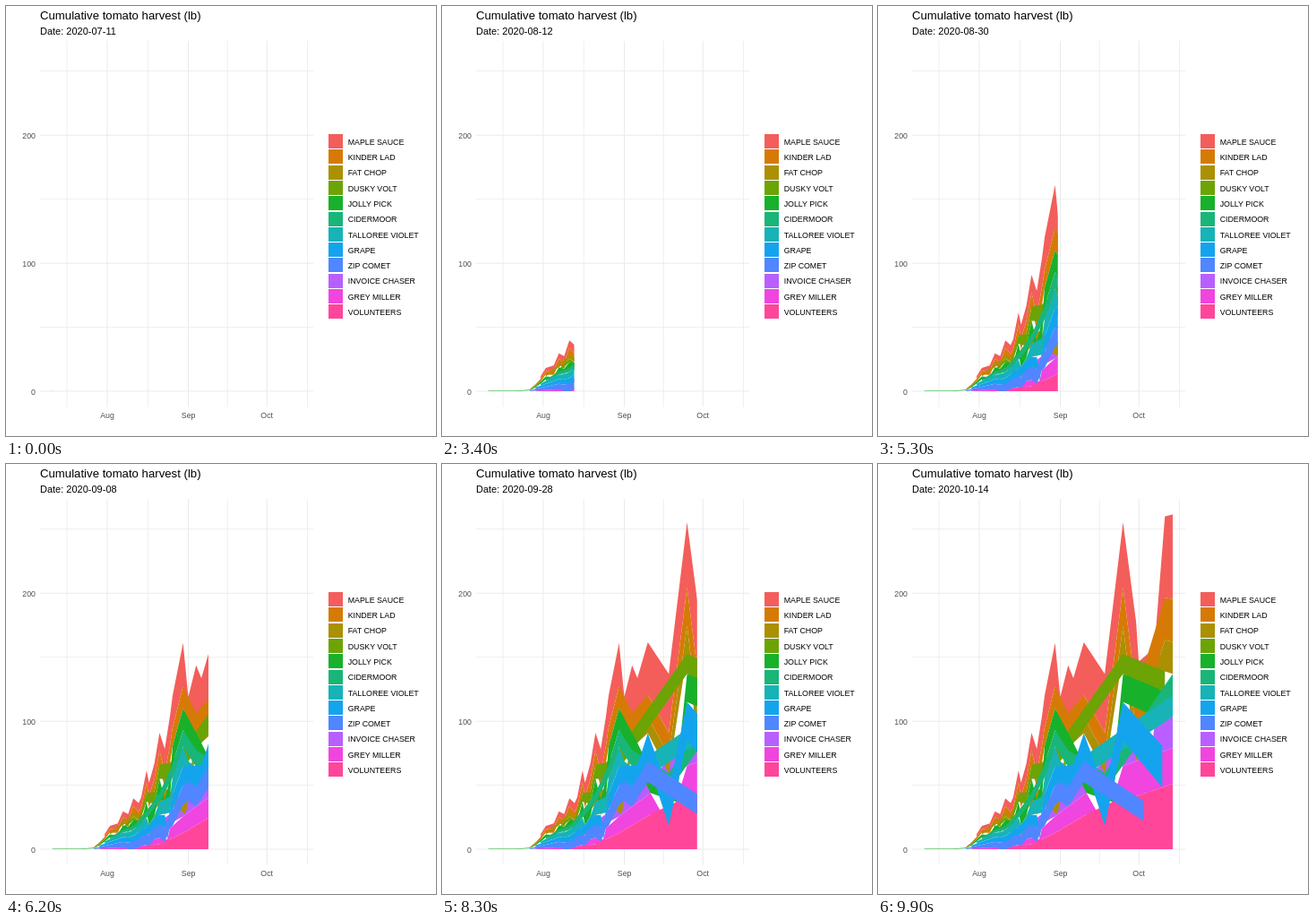
Animation of 480x480 px, one loop 10000 ms. Source, as an HTML page:

```html
<!DOCTYPE html>
<html lang="en">
<head>
<meta charset="utf-8">
<title>Tomato harvest</title>
<style>
  html, body { margin: 0; width: 100%; height: 100%; overflow: hidden; background: #fff; }
  svg { display: block; width: 480px; height: 480px; }
  text { font-family: "Liberation Sans", Arial, sans-serif; font-size: 8.8px; }
  .axis { fill: #4d4d4d; }
</style>
</head>
<body>
<svg id="stage" viewBox="0 0 480 480">
  <clipPath id="reveal"><rect id="window" x="38" y="39" width="0" height="408"/></clipPath>
  <text x="38" y="15" style="font-size:13.2px">Cumulative tomato harvest (lb)</text>
  <text id="date" x="38" y="32" style="font-size:11px"></text>
</svg>
<script>
const stage = document.getElementById('stage');
const windowRect = document.getElementById('window');
const dateText = document.getElementById('date');

const xOf = day => 51.7 + day * 2.919;
const yOf = lb => 430 - lb * 1.429;

function add(parent, tag, attrs, text) {
  const el = document.createElementNS('http://www.w3.org/2000/svg', tag);
  for (const key in attrs) el.setAttribute(key, attrs[key]);
  if (text) el.textContent = text;
  parent.appendChild(el);
  return el;
}

// Pounds picked so far of each variety on the key days.
const keyDays = [14, 32, 41, 50, 69, 76, 95];
const varieties = {
  A: ['MAPLE SAUCE', '#f35e5a', 0, 6, 14, 34, 46, 51, 66],
  B: ['KINDER LAD', '#d57b05', 0, 6, 11, 17, 17.5, 30, 33.5],
  C: ['FAT CHOP', '#ab9003', 0, 3, 8, 11, 14, 22, 25],
  D: ['DUSKY VOLT', '#6ca305', 0, 3, 11, 15, 15.5, 15.5, 15.5],
  E: ['JOLLY PICK', '#17b12b', 0, 5, 11, 17, 19, 22, 23],
  F: ['CIDERMOOR', '#19b579', 0, 3, 7, 13, 14, 15, 16.5],
  G: ['TALLOREE VIOLET', '#17b3b7', 0, 5, 10, 15.5, 15.5, 16, 17],
  H: ['GRAPE', '#14a4ed', 0, 5, 8, 15, 27, 30, 33],
  I: ['ZIP COMET', '#5086ff', 0, 6, 10, 15, 17, 16, 15],
  J: ['INVOICE CHASER', '#b95fff', 0, 2, 4, 9, 11, 20, 24.5],
  K: ['GREY MILLER', '#f045df', 0, 2, 5, 13, 18.5, 27, 28],
  L: ['VOLUNTEERS', '#ff469b', 0, 1, 4, 12.6, 36, 38, 51]
};

// Varieties picked on each day; only these stack up on that day.
const picked = {
  0: 'E', 10: 'E', 16: 'BEI', 18: 'BEHIK', 20: 'ABEGHIJ', 22: 'ABCEFGHIK', 25: 'ABDEHIK',
  27: 'ABCEFGHIJ', 29: 'ABEGHI', 31: 'ABCDEFGHI', 33: 'ABDGHIL', 34: 'ABCEHIK',
  36: 'ABDEFGHIK', 37: 'ABCEGIL', 39: 'ABDEGIKL', 41: 'ABDEFGHIKL', 43: 'ABCEHIL',
  44: 'HK', 45: 'ABDEGIKL', 46: 'ABEFGHIKL', 50: 'ABEFGHIJKL', 51: 'CKL', 52: 'ADGIJKL',
  55: 'ABCFGIKL', 57: 'ACEHJKL', 61: 'ABCHIJKL', 62: 'EKL', 69: 'ABCFHK', 72: 'EL',
  76: 'ABCDEHJKL', 81: 'ABCKL', 82: 'AJKL', 84: 'IJ', 88: 'AJKL', 91: 'HL',
  92: 'ABCDEJKL', 95: 'ABCFGJKL'
};

function pounds(id, day) {
  const values = varieties[id].slice(2);
  if (day <= keyDays[0]) return 0.3;
  const i = keyDays.findIndex(key => key >= day);
  const part = (day - keyDays[i - 1]) / (keyDays[i] - keyDays[i - 1]);
  return values[i - 1] + (values[i] - values[i - 1]) * part;
}

const edges = {};
for (const id in varieties) edges[id] = { top: [], bottom: [] };
for (const day in picked) {
  let sum = 0;
  for (const id of [...picked[day]].reverse()) {
    const x = xOf(+day);
    edges[id].bottom.unshift([x, yOf(sum)]);
    sum += pounds(id, +day);
    edges[id].top.push([x, yOf(sum)]);
  }
}

function gridLine(d, major) {
  add(stage, 'path', { d, stroke: '#ebebeb', 'stroke-width': major ? 1.1 : 0.8 });
}
for (const y of [72.5, 215.7, 358.5]) gridLine(`M38 ${y}H343`, false);
for (const x of [68, 158.3, 247.3, 336.5]) gridLine(`M${x} 39V447.5`, false);
for (const y of [144.3, 287.2, 430]) gridLine(`M38 ${y}H343`, true);
for (const x of [113, 203.6, 291.2]) gridLine(`M${x} 39V447.5`, true);

const plot = add(stage, 'g', { 'clip-path': 'url(#reveal)' });
for (const id of 'JKLABCDEFGHI') {
  const { top, bottom } = edges[id];
  add(plot, 'polygon', { points: top.concat(bottom).join(' '), fill: varieties[id][1] });
}

Object.values(varieties).forEach(([name, fill], i) => {
  const y = 143.1 + i * 17.28;
  add(stage, 'rect', { x: 360, y: Math.round(y), width: 16, height: 16, fill });
  add(stage, 'text', { x: 381.7, y: y + 11.8 }, name);
});

[['0', 433.5], ['100', 290.7], ['200', 147.6]].forEach(([label, y]) =>
  add(stage, 'text', { x: 33, y, 'text-anchor': 'end', class: 'axis' }, label));
[['Aug', 113], ['Sep', 203.6], ['Oct', 291.2]].forEach(([label, x]) =>
  add(stage, 'text', { x, y: 460, 'text-anchor': 'middle', class: 'axis' }, label));

// 100 steps of 100 ms cover 95 days.
const firstDay = Date.UTC(2020, 6, 11);
let start = null;

function draw(now) {
  if (start === null) start = now;
  const step = Math.floor(Math.max(0, now - start) / 100) % 100;
  const day = step * 95 / 99;
  const date = new Date(firstDay + Math.floor(day + 1e-6) * 864e5);
  dateText.textContent = 'Date: ' + date.toISOString().slice(0, 10);
  windowRect.setAttribute('width', xOf(day) + 0.6 - 38);
  requestAnimationFrame(draw);
}
draw(performance.now());
</script>
</body>
</html>
```
